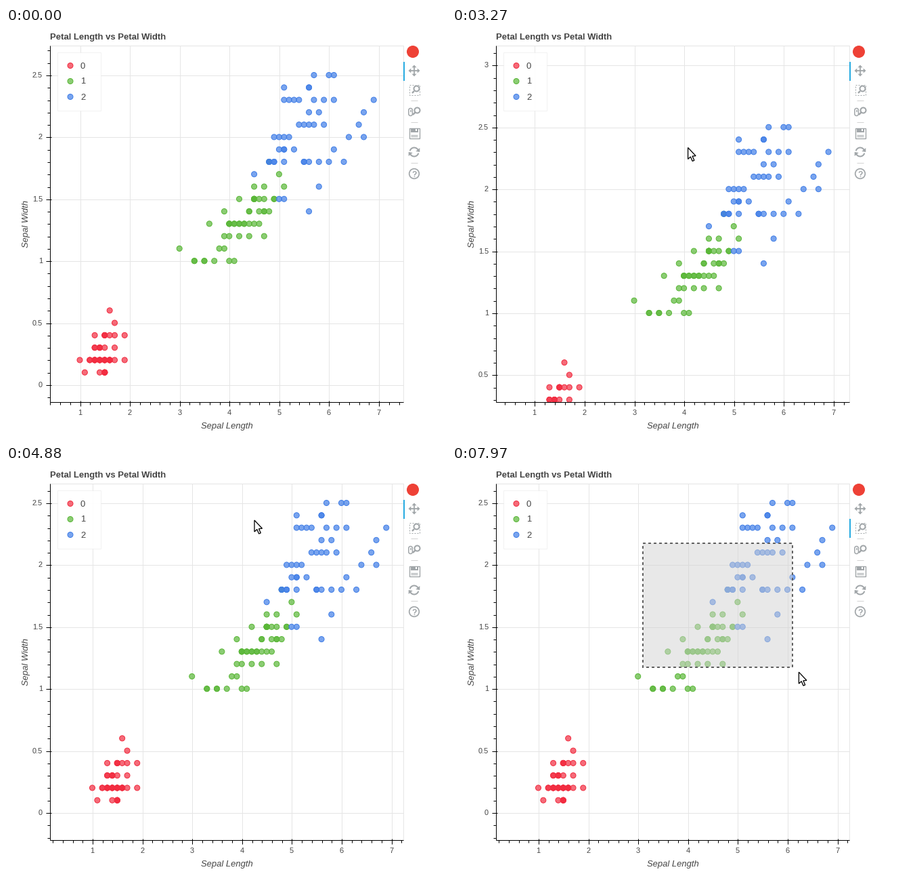
Recreate the animation shown at these times as a matplotlib script. Size 650 px wide and 605 px high, loop 8 s.

```python
import numpy as np
import matplotlib.pyplot as plt
from matplotlib.animation import FuncAnimation
from matplotlib.collections import LineCollection
from matplotlib.patches import Arc, Circle, FancyBboxPatch, Polygon, Rectangle

W, H, STEP, LOOP = 650, 605, 40, 8000
LEFT, RIGHT, TOP, BOTTOM = 64.5, 586.5, 25.5, 551.5
COLORS = ["#f22c40", "#5ab738", "#407ee7"]
GRID, INK, ICON = "#e5e5e5", "#444444", "#a1a6a9"
PX = 0.72  # points per pixel at 100 dpi

# Petal widths -> petal lengths, both in millimetres
GROUPS = [
    {1: [11, 14] + [15] * 4,
     2: [10, 17, 19] + [12] * 2 + [13, 14, 15, 16] * 4,
     3: [13, 13, 14, 14, 14, 15, 17],
     4: [13, 15, 15, 15, 16, 17, 19], 5: [17], 6: [16]},
    {10: [33, 33, 35, 35, 37, 40, 41], 11: [30, 38, 39],
     12: [39, 40, 42, 44, 47],
     13: [36, 44, 45, 46, 40] + [40, 41, 42, 43] * 2,
     14: [39, 44, 44, 46, 47, 47, 48],
     15: [42, 46, 47, 49, 49] + [45] * 5,
     16: [45, 47, 51], 17: [50], 18: [48]},
    {14: [56], 15: [50, 51], 16: [58], 17: [45],
     18: [48, 48, 49, 49, 51, 55, 55, 56, 58, 60, 63],
     19: [50, 51, 51, 53, 61], 20: [49, 50, 51, 52, 64, 67],
     21: [54, 55, 56, 57, 59, 66], 22: [56, 58, 67],
     23: [51, 52, 53, 54, 57, 59, 61, 69],
     24: [51, 56, 56], 25: [57, 60, 61]},
]

# Pointer strokes as (ms, x, y); it rests between them
STROKES = [
    [(860, 646, 50), (1100, 590, 59), (1400, 508, 70), (1660, 442, 77),
     (1700, 430.5, 80.5), (1880, 376, 90), (2040, 348.5, 95)],
    [(2640, 348.5, 95), (2800, 354, 108), (3000, 376, 140), (3130, 376, 164),
     (3230, 352.5, 175), (3270, 334, 181), (3460, 272, 192), (3560, 256, 184),
     (3740, 253, 158), (3900, 270, 116), (3940, 278, 104), (4080, 300, 82),
     (4260, 319, 77), (4370, 340, 81), (4410, 352, 85), (4580, 372, 88)],
    [(4700, 372, 88), (4840, 367, 80)],
    [(5240, 367, 80), (5440, 462, 117), (5560, 545, 113), (5680, 594, 87)],
    [(5880, 594, 87), (5950, 600, 87)],
    [(6200, 600, 87), (6400, 495, 94), (6600, 350, 107), (6780, 288, 112)],
    [(6900, 288, 112), (7060, 281.5, 113.5)],
    [(7100, 281.5, 113.5), (7400, 332, 150), (7730, 428, 229),
     (7930, 506, 300), (7970, 514, 305), (8040, 526, 313)],
]
PAN_START, PAN_END = 2640, 4880
DRAG_START = 7140
LAG = 40
TIP_SHOWN, PICKED = 6110, 6230


def stroke_at(keys, t):
    """Smooth curve through timed points, starting and ending at rest."""
    k = np.array(keys, float)
    times, pts = k[:, 0], k[:, 1:]
    slope = np.zeros_like(pts)
    slope[1:-1] = (pts[2:] - pts[:-2]) / (times[2:] - times[:-2])[:, None]
    i = min(np.searchsorted(times, t, side="right") - 1, len(k) - 2)
    d = times[i + 1] - times[i]
    u = (t - times[i]) / d
    return ((1 + 2 * u) * (1 - u) ** 2 * pts[i] + u * (1 - u) ** 2 * d * slope[i]
            + u * u * (3 - 2 * u) * pts[i + 1] + u * u * (u - 1) * d * slope[i + 1])


def pointer(t):
    pos = np.array(STROKES[0][0][1:], float)
    for keys in STROKES:
        if t < keys[0][0]:
            break
        if t < keys[-1][0]:
            return stroke_at(keys, t)
        pos = np.array(keys[-1][1:], float)
    return pos


fig = plt.figure(figsize=(W / 100, H / 100), dpi=100, facecolor="white")
ax = fig.add_axes([0, 0, 1, 1])
ax.set_xlim(0, W)
ax.set_ylim(H, 0)
ax.axis("off")


def label(x, y, s, size=13, color=INK, **kw):
    return ax.text(x, y, s, fontsize=size * PX, color=color,
                   family="Liberation Sans", va="baseline", **kw)


def segments(color, width=1, z=3):
    return ax.add_collection(LineCollection([], colors=color, linewidths=width * PX,
                                            zorder=z), autolim=False)


def line(xs, ys, color=ICON, width=1.5, **kw):
    ax.plot(xs, ys, color=color, lw=width * PX, solid_capstyle="butt", **kw)


def shape(patch, z=3):
    patch.set_zorder(z)
    return ax.add_patch(patch)


def rect(x0, y0, x1, y1, z=3, width=1, **kw):
    return shape(Rectangle((x0, y0), x1 - x0, y1 - y0, lw=width * PX, **kw), z)


def ring(x, y, r, width=1.5):
    shape(Circle((x, y), r, fc="none", ec=ICON, lw=width * PX))


def solid(points):
    shape(Polygon(points, fc=ICON, ec="none"))


def lens(x, y):
    ring(x, y, 4, 2)
    line([x - 2.8, x - 6.5], [y + 2.8, y + 6.5], width=2.4)


def draw_toolbar():
    shape(Circle((601, 35), 9, fc="#ee4136", ec="none"))

    cx, cy = 603, 63
    line([cx - 6, cx + 6], [cy, cy], width=1.8)
    line([cx, cx], [cy - 6, cy + 6], width=1.8)
    for dx, dy in [(1, 0), (-1, 0), (0, 1), (0, -1)]:
        tip = np.array([cx + 8.5 * dx, cy + 8.5 * dy])
        back, side = np.array([dx, dy]) * 3.8, np.array([dy, dx]) * 3.5
        solid([tip, tip - back + side, tip - back - side])

    rect(595.5, 83.5, 610.5, 98.5, fc="none", ec=ICON, ls=(0, (2, 2)))
    shape(Circle((606.5, 89.5), 5.2, fc="white", ec="none"))
    lens(606.5, 89.5)

    shape(FancyBboxPatch((594.8, 118.5), 5.6, 11, fc="none", ec=ICON, lw=1.5 * PX,
                         boxstyle="round,pad=0,rounding_size=2.8"))
    line([597.6, 597.6], [120.5, 124])
    lens(607.5, 121.5)

    rect(595.5, 147.5, 610.5, 162.5, fc="none", ec=ICON, width=1.4)
    rect(598, 147.5, 608.5, 153.5, fc=ICON, ec="none")
    rect(604.5, 148.5, 606.5, 152, fc="white", ec="none")
    line([598, 608], [157.5, 157.5], width=1)
    line([598, 608], [160, 160], width=1)

    cx, cy = 603, 183
    for a0, a1 in [(195, 335), (15, 155)]:
        shape(Arc((cx, cy), 13, 13, theta1=a0, theta2=a1, ec=ICON, lw=2 * PX))
    solid([(611.3, 177), (611.3, 183), (605.3, 182)])
    solid([(594.7, 189), (594.7, 183), (600.7, 184)])

    ring(603, 215, 7.3, 1.7)
    label(603, 219.5, "?", 12, ICON, ha="center", weight="bold")

    for y in (106.5, 138.5, 198.5):
        line([597.5, 607.5], [y, y], "#d3d3d3", 1)


def draw_frame_parts():
    rect(LEFT, TOP, RIGHT, BOTTOM, fc="none", ec=GRID, z=1)
    line([LEFT, LEFT], [TOP, BOTTOM], "black", 1, zorder=4)
    line([LEFT, RIGHT], [BOTTOM, BOTTOM], "black", 1, zorder=4)
    label(65, 17, "Petal Length vs Petal Width", 13.1, weight="bold")
    label(326, 591, "Sepal Length", ha="center", style="italic")
    label(32.5, 288.5, "Sepal Width", ha="center", style="italic",
          rotation=90, rotation_mode="anchor")
    rect(75.5, 35.5, 139.5, 121.5, fc=(1, 1, 1, 0.95), ec=(0.9, 0.9, 0.9, 0.5), z=5)
    for i, color in enumerate(COLORS):
        y = 55.5 + 23 * i
        shape(Circle((95, y), 4, fc=color, ec="none", alpha=0.7), 6)
        shape(Circle((95, y), 4, fc="none", ec=color, lw=PX), 6)
        label(110, y + 4, str(i), zorder=6)


draw_toolbar()
draw_frame_parts()

plot_area = Rectangle((LEFT, TOP), RIGHT - LEFT, BOTTOM - TOP,
                      transform=ax.transData)
data, fills, edges = [], [], []
for rows, color in zip(GROUPS, COLORS):
    rgb = tuple(int(color[i:i + 2], 16) / 255 for i in (1, 3, 5))
    for width, lengths in rows.items():
        for length in lengths:
            data.append((length / 10, width / 10))
            fills.append(rgb + (0.7,))
            edges.append(rgb)
data = np.array(data)

ORIGIN = np.array([35.4, 526.5])
SCALE = np.array([73.6, -182.8])
dots = ax.scatter(*(ORIGIN + data * SCALE).T, s=(8 * PX) ** 2, c=fills,
                  edgecolors=edges, linewidths=PX, zorder=3)
dots.set_clip_path(plot_area)

grid = segments(GRID, z=1)
ticks = segments("black", z=4)
x_labels = [label(0, 571, f"{v}", 11, ha="center") for v in range(0, 11)]
y_values = np.arange(0, 4, 0.5)
y_labels = [label(54, 0, f"{v:g}", 11, ha="right") for v in y_values]

active = rect(587, 50, 589, 78, fc="#26aae1", ec="none")
tip_box = rect(504.5, 78.5, 585.5, 108.5, fc="white", ec=GRID, z=7)
tip_text = label(515, 99, "Box Zoom", 13.1, "black", zorder=8)
zoom_fill = rect(0, 0, 1, 1, fc="#d3d3d3", ec="none", alpha=0.5, z=7)
zoom_edge = rect(0, 0, 1, 1, fc="none", ec="#626262", width=2, ls=(0, (2, 2)), z=8)
ARROW = np.array([(0, 0), (0, 17), (3.8, 13.5), (6.6, 20), (9.3, 18.8),
                  (6.5, 12.6), (11.5, 12.2)])
arrow = shape(Polygon(ARROW, fc="white", ec="black", lw=1.3 * PX,
                      joinstyle="miter"), 10)


def snap(v):
    return np.floor(v) + 0.5


def update_axes(pan):
    ox, oy = ORIGIN + pan
    lines, marks = [], []
    for k in range(0, 51):
        x = snap(ox + k * 0.2 * SCALE[0])
        major = k % 5 == 0
        shown = LEFT <= x <= RIGHT
        if shown:
            marks.append([(x, BOTTOM - 2 * major), (x, BOTTOM + 4 + 2 * major)])
        if major:
            if shown:
                lines.append([(x, TOP), (x, BOTTOM)])
            x_labels[k // 5].set_visible(shown)
            x_labels[k // 5].set_x(x)
    for k in range(-10, 40):
        y = snap(oy + k * 0.1 * SCALE[1])
        major = k % 5 == 0
        shown = TOP <= y <= BOTTOM
        if shown:
            marks.append([(LEFT + 2 * major, y), (LEFT - 4 - 2 * major, y)])
        if major and k >= 0:
            if shown:
                lines.append([(LEFT, y), (RIGHT, y)])
            y_labels[k // 5].set_visible(shown)
            y_labels[k // 5].set_y(y + 3.7)
    grid.set_segments(lines)
    ticks.set_segments(marks)


def update(n):
    t = n * STEP
    pan = pointer(np.clip(t - LAG, PAN_START, PAN_END)) - pointer(PAN_START)
    dots.set_offsets(ORIGIN + pan + data * SCALE)
    update_axes(pan)

    arrow.set_visible(t >= 860)
    arrow.set_xy(pointer(t) + ARROW)
    active.set_y(78 if t >= PICKED else 50)
    for part in (tip_box, tip_text):
        part.set_visible(TIP_SHOWN - STEP / 2 < t < PICKED + 50)

    x0, y0 = pointer(DRAG_START - LAG)
    x1, y1 = pointer(t - LAG)
    for part in (zoom_fill, zoom_edge):
        part.set_visible(t > DRAG_START)
        part.set_bounds(x0 + 0.5, y0 + 0.5, x1 - x0, y1 - y0)
    return []


anim = FuncAnimation(fig, update, frames=LOOP // STEP, interval=STEP,
                     repeat=True, repeat_delay=0, blit=False)
plt.show()
```
